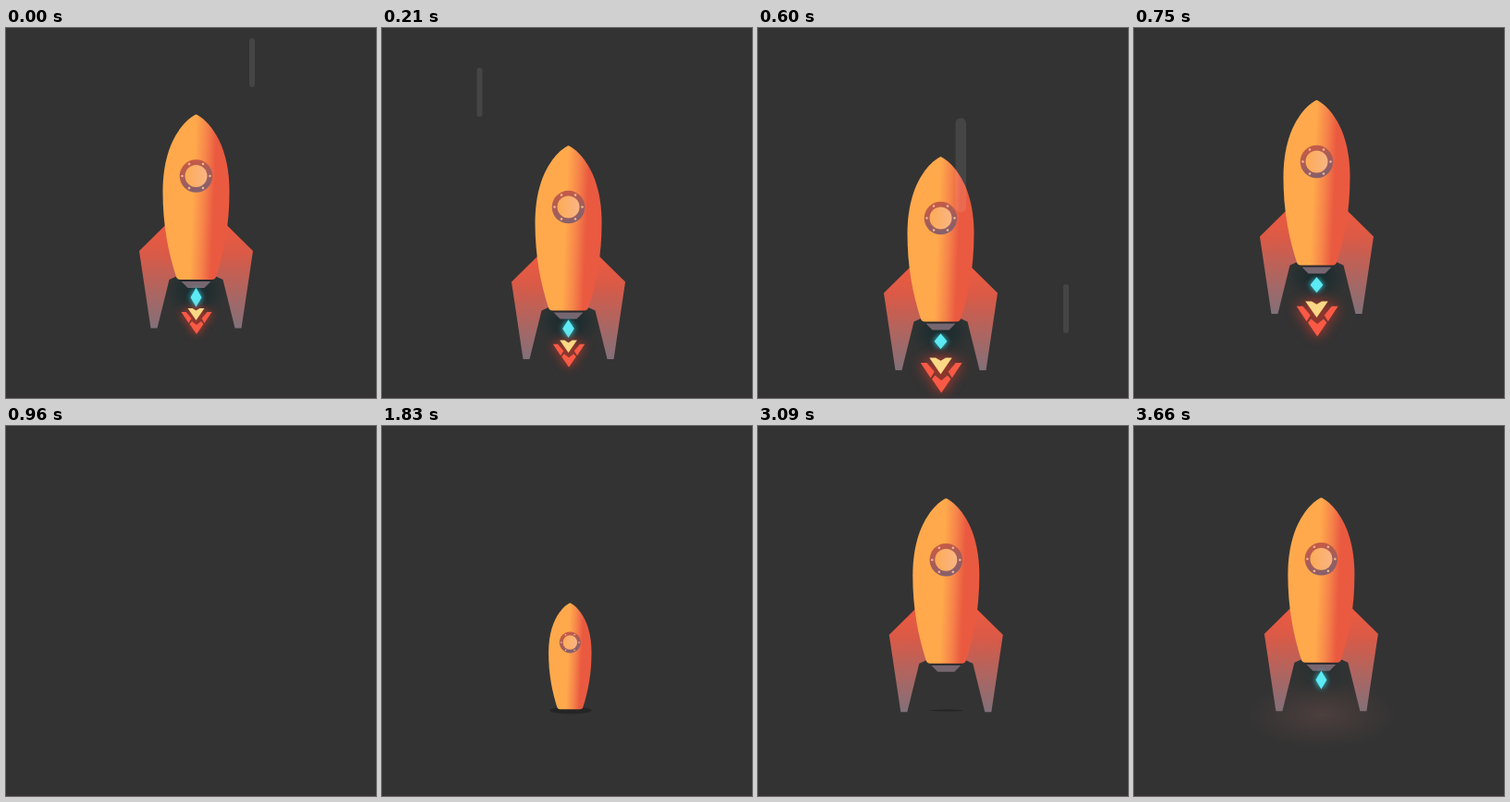
Recreate the animation shown at these times as an HTML page. Size 400 px wide and 400 px high, loop 3690 ms.

```html
<!DOCTYPE html>
<html lang="en">
<head>
<meta charset="utf-8">
<title>Rocket launch</title>
<style>
  html, body { margin: 0; width: 100%; height: 100%; overflow: hidden; background: #333; }
  svg { display: block; width: 100vw; height: 100vh; }
  #jet { filter: drop-shadow(0 0 3px #36d6e2); }
  #fire { filter: drop-shadow(0 0 5px rgba(255, 60, 40, .9)); }
</style>
</head>
<body>
<svg viewBox="0 0 400 400">
  <defs>
    <linearGradient id="skin" gradientUnits="userSpaceOnUse" x1="-36" y1="88.5" x2="36" y2="91.5">
      <stop offset=".45" stop-color="#ffa94c"/>
      <stop offset=".62" stop-color="#f6844a"/>
      <stop offset=".77" stop-color="#ea5a40"/>
    </linearGradient>
    <linearGradient id="wing" gradientUnits="userSpaceOnUse" x1="0" y1="125" x2="0" y2="231">
      <stop offset="0" stop-color="#ea5a41"/>
      <stop offset=".25" stop-color="#d95a47"/>
      <stop offset="1" stop-color="#837079"/>
    </linearGradient>
    <linearGradient id="ring" x1=".3" y1="0" x2=".7" y2="1">
      <stop offset="0" stop-color="#cb5a44"/>
      <stop offset="1" stop-color="#81606f"/>
    </linearGradient>
    <linearGradient id="glass">
      <stop offset="0" stop-color="#fdab56"/>
      <stop offset="1" stop-color="#f9b583"/>
    </linearGradient>
    <radialGradient id="dim">
      <stop offset="0" stop-color="#10262b" stop-opacity=".8"/>
      <stop offset=".5" stop-color="#152a2e" stop-opacity=".5"/>
      <stop offset="1" stop-color="#22302f" stop-opacity="0"/>
    </radialGradient>
    <radialGradient id="haze">
      <stop offset="0" stop-color="#7a5650" stop-opacity=".36"/>
      <stop offset=".6" stop-color="#6a4a48" stop-opacity=".17"/>
      <stop offset="1" stop-color="#5a4040" stop-opacity="0"/>
    </radialGradient>
    <path id="fin" d="M-30 117L-61.5 148L-49 231.500H-42L-29 179L-18 174Z" fill="url(#wing)"/>
    <path id="spark" d="M-16 214H-11L-5 221L-8 226Z" fill="#f85a45"/>
  </defs>

  <rect width="400" height="400" fill="#333"/>
  <rect y="398" width="400" height="2" fill="#373234"/>
  <ellipse id="shadow" cx="204" cy="307.5" fill="#222"/>
  <ellipse id="glow" cx="203" cy="312" rx="85" ry="38" fill="url(#haze)"/>

  <g id="rocket">
    <ellipse id="shade" cy="190" rx="36" ry="30" fill="url(#dim)"/>
    <g id="fins">
      <use href="#fin"/>
      <use href="#fin" transform="scale(-1 1)"/>
    </g>
    <g id="nozzle">
      <path d="M-18 178H18L16 181H-16Z" fill="#29272a"/>
      <path d="M-16 181H16L9 188H-9Z" fill="#76666f"/>
    </g>
    <path id="jet" d="M0 -10L6 0L0 10L-6 0Z" fill="#5ceaf4"/>
    <g id="fire">
      <use href="#spark"/>
      <use href="#spark" transform="translate(1 0) scale(-1 1)"/>
      <path d="M-7 227L-4.500 224L.5 228L5.500 224L8 227L.5 238Z" fill="#f85a45"/>
      <path d="M-9 210H-4L0 212.500L4 210H9L0 223Z" fill="#fbd885"/>
    </g>
    <path d="M0 .6C2 .8 36 19 36 84C36 120 30 150 21.500 176Q20.500 179 17 179H-17Q-20.500 179 -21.500 176C-30 150 -36 120 -36 84C-36 19 -2 .8 0 .6Z" fill="url(#skin)"/>
    <g id="port" transform="translate(0 67)">
      <circle r="17.800" fill="url(#ring)"/>
      <circle r="12" fill="url(#glass)"/>
    </g>
  </g>
  <g id="lines" fill="#fff" fill-opacity=".092"></g>
</svg>

<script>
const LOOP = 3690, STEP = 30, GONE = 960, POP = 1740;
const NS = "http://www.w3.org/2000/svg";
const $ = id => document.getElementById(id);

function set(el, attrs) {
  for (const k in attrs) el.setAttribute(k, attrs[k]);
  return el;
}
function add(parent, tag, attrs) {
  return parent.appendChild(set(document.createElementNS(NS, tag), attrs));
}
function show(el, on) {
  el.style.display = on ? "" : "none";
}

// Progress from 0 to 1 between two times
const ramp = (t, from, to) => Math.min(1, Math.max(0, (t - from) / (to - from)));
const easeOut = (p, n) => 1 - (1 - p) ** n;
const smooth = p => p * p * (3 - 2 * p);
const backOut = p => 1 + 2.7 * (p - 1) ** 3 + 1.7 * (p - 1) ** 2;

for (let i = 0; i < 6; i++) {
  const a = i * Math.PI / 3;
  add($("port"), "circle", { cx: 15 * Math.cos(a), cy: 15 * Math.sin(a), r: 1.3, fill: "#f3b58c" });
}

function streak(x, start, w = 6, h = 53, speed = 2) {
  return { start, h, speed, el: add($("lines"), "rect", { x, width: w, height: h, rx: w / 2 }) };
}
const streaks = [
  streak(263, -32), streak(102.5, 162), streak(337, 300), streak(330, 435),
  streak(213.5, 517, 11.5, 102, 2.4)
];

function pose(x, top, size) {
  set($("rocket"), { transform: `translate(${x} ${top + 179}) scale(${size}) translate(0 -179)` });
}
function grow(id, y, scale) {
  set($(id), { transform: `translate(0 ${y}) scale(${scale}) translate(0 ${-y})` });
}
function jet(y, w, h) {
  set($("jet"), { transform: `translate(0 ${y}) scale(${w} ${h})` });
}

// Recoil downwards, then shoot up off the stage
function launch(t) {
  const p = ramp(t, 0, 600);
  const dip = 47 * easeOut(ramp(t, 0, 500), 2.3);
  const climb = 500 * ramp(t, 540, GONE) ** 3;
  pose(205.5 - 8 * easeOut(p, 1.6), 93 + dip - climb, 1);
  grow("fins", 108, 1);
  grow("fire", 188, 1 + .36 * p * p);
  set($("nozzle"), { transform: "" });
  jet(198.3 + 2 * p * p, 1 + .15 * p, 1.05 - .2 * p);
  set($("shade"), { opacity: 1 });
}

// Hull pops up, legs push it off the ground, nozzle and jet follow
function build(t) {
  const size = backOut(ramp(t, POP, 2250));
  const legs = .6 + .4 * easeOut(ramp(t, 2240, 2790), 4);
  const lift = 1.2 * smooth(ramp(t, 2820, 3660));
  const out = easeOut(ramp(t, 2790, 3060), 4);
  const lit = smooth(ramp(t, 3360, 3600));
  pose(203.3 - .9 * ramp(t, 3090, 3660), 201 - 123 * legs - lift, size);
  grow("fins", 108, legs);
  set($("nozzle"), { transform: `translate(0 ${12 * (out - 1)})` });
  jet(188 + 9.7 * lit, lit, lit);
  set($("shade"), { opacity: .35 * lit });
  set($("shadow"), {
    rx: size * (18 + 43 * (1 - legs)),
    ry: size * (1 + 12 * (1 - legs)),
    opacity: .8 * (1 - ramp(t, 3360, 3540))
  });
  set($("glow"), { opacity: ramp(t, 3420, 3660) });
}

function draw(t) {
  const flying = t < GONE, built = t >= POP;
  show($("rocket"), flying || built);
  show($("fire"), flying);
  show($("fins"), flying || t > 2250);
  show($("shadow"), built);
  show($("glow"), built);
  show($("lines"), flying);
  for (const s of streaks) s.el.setAttribute("y", s.speed * (t - s.start) - s.h);
  if (flying) launch(t);
  if (built) build(t);
}

const start = performance.now();
function tick() {
  const t = (performance.now() - start) % LOOP;
  draw(Math.floor(t / STEP) * STEP);
  requestAnimationFrame(tick);
}
tick();
</script>
</body>
</html>
```
